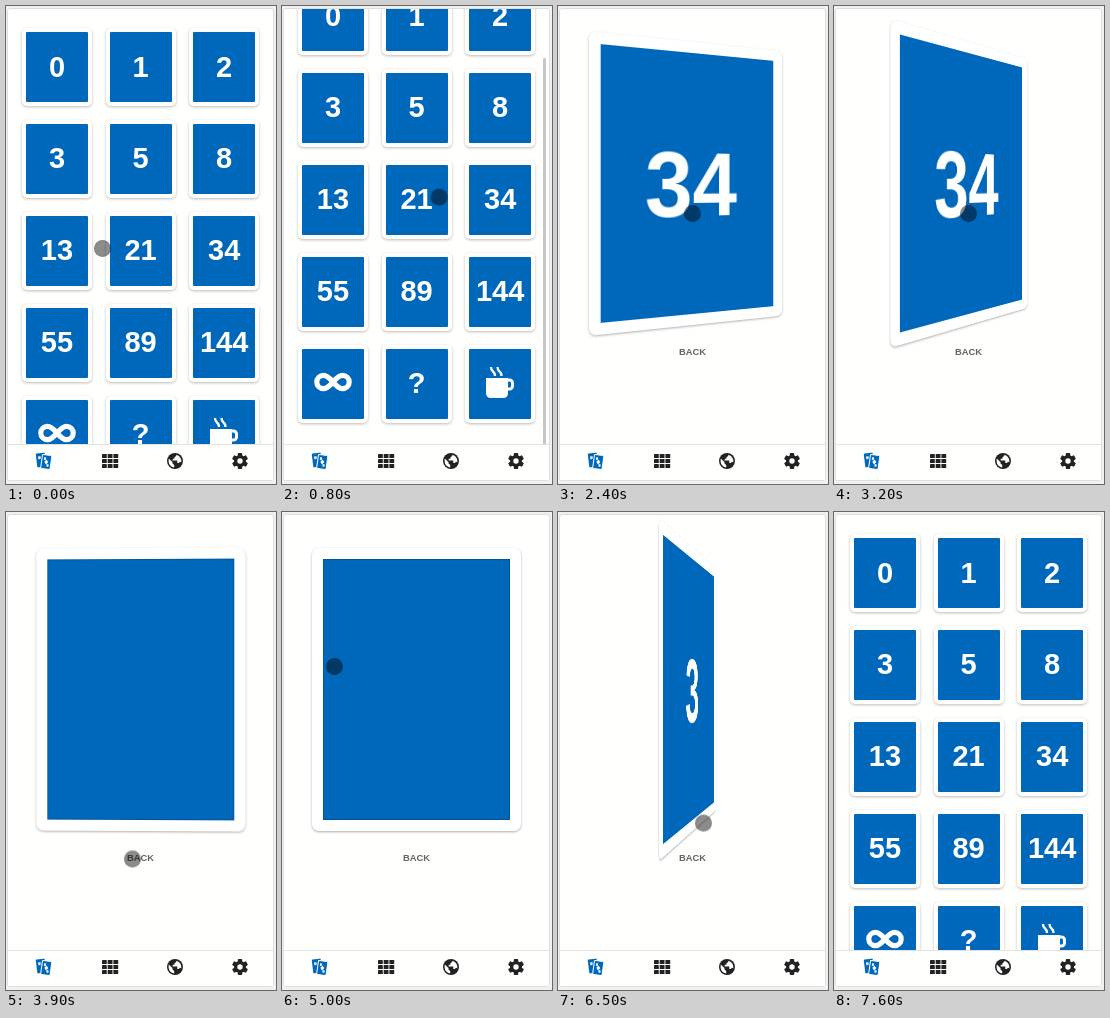
Recreate the animation shown at these times as an HTML page. Size 270x478 px, loop 9000 ms.

```html
<!DOCTYPE html>
<html lang="en">
<head>
<meta charset="utf-8">
<title>Planning cards</title>
<style>
  :root { --blue: #0068ba; --paper: #fffffd; --ink: #222; --loop: 9s linear infinite; }
  * { box-sizing: border-box; }
  html, body { margin: 0; width: 100%; height: 100%; overflow: hidden; background: #f1f1ef; }
  #stage {
    position: relative; width: 270px; height: 478px; overflow: hidden;
    font: bold 29px "Liberation Sans", Arial, sans-serif; color: #fff;
  }
  #stage > *, .face, .face b { position: absolute; }

  #phone {
    left: 1px; top: 2px; width: 267px; height: 473px;
    background: var(--paper); border: 1px solid #dededc; border-radius: 3px;
  }

  /* Overview */
  #overview { left: 2px; top: 3px; width: 265px; height: 435px; overflow: hidden; animation: overview var(--loop); }
  #grid {
    position: absolute; left: 14px; top: 19px;
    display: grid; grid: repeat(5, 78px) / repeat(3, 70px); gap: 13.9px 13.6px;
    animation: scroll var(--loop);
  }
  .tile {
    display: flex; align-items: center; justify-content: center;
    background: var(--blue); border: 4px solid #fff; border-radius: 5px;
    box-shadow: 0 1px 3px rgba(0, 0, 0, .27);
  }
  .tile svg { overflow: visible; }
  #bar {
    left: 261px; top: 52px; width: 3px; height: 415px; border-radius: 2px;
    background: rgba(0, 0, 0, .35); animation: bar var(--loop);
  }

  /* Single card */
  #detail { inset: 0; animation: detail var(--loop); }
  #scene { position: absolute; left: 30px; top: 36px; width: 209px; height: 283px; perspective: 576px; }
  #card { width: 100%; height: 100%; transform-style: preserve-3d; animation: flip var(--loop); }
  .face {
    inset: 0; background: #fff; border-radius: 7px; backface-visibility: hidden;
    box-shadow: 0 1px 2.5px rgba(0, 0, 0, .32);
  }
  .face::before { content: ""; position: absolute; inset: 11px; background: var(--blue); }
  .back { transform: rotateY(180deg); }
  .back::before { box-shadow: inset 0 0 0 .7px #004f8e; }
  .face b { inset: 2px 0 -2px; font-size: 90px; line-height: 283px; text-align: center; }
  .first { animation: first var(--loop); }
  .second { animation: second var(--loop); }
  #label {
    position: absolute; left: 0; top: 338px; width: 269px; text-align: center;
    font-size: 9.4px; line-height: 16px; color: #666;
  }

  #tabs { left: 0; top: 438px; }
  #touch {
    left: -8.5px; top: -8.5px; width: 17px; height: 17px; border-radius: 50%;
    background: radial-gradient(circle, rgba(0, 0, 0, .45) 52%, rgba(0, 0, 0, .5) 80%, rgba(0, 0, 0, .2) 100%);
    animation: touch var(--loop);
  }

  @keyframes overview {
    0%, 14.33% { visibility: visible; }
    14.34%, 45.44% { visibility: hidden; }
    45.45%, 55.44% { visibility: visible; }
    55.45%, 80.99% { visibility: hidden; }
    81%, 100% { visibility: visible; }
  }
  @keyframes detail {
    0%, 14.33% { visibility: hidden; }
    14.34%, 45.44% { visibility: visible; }
    45.45%, 55.44% { visibility: hidden; }
    55.45%, 80.99% { visibility: visible; }
    81%, 100% { visibility: hidden; }
  }
  @keyframes first { 0%, 50% { opacity: 1; } 50.01%, 100% { opacity: 0; } }
  @keyframes second { 0%, 50% { opacity: 0; } 50.01%, 100% { opacity: 1; } }
  @keyframes scroll {
    0%, .4% { transform: none; }
    3.3%, 20% { transform: translateY(-51px); }
    20.01%, 100% { transform: none; }
  }
  @keyframes bar {
    0%, .4% { opacity: 0; transform: translateY(-46px); }
    1% { opacity: 1; }
    3.3% { transform: none; }
    7.2% { opacity: 1; }
    12%, 100% { opacity: 0; transform: none; }
  }
  @keyframes flip {
    0% { transform: rotateY(180deg); }
    20.23% { transform: rotateY(180deg); animation-timing-function: ease; }
    31.34% { transform: rotateY(0deg); }
    33.44% { transform: rotateY(0deg); animation-timing-function: ease; }
    44.5% { transform: rotateY(180deg); }
    60.28% { transform: rotateY(180deg); animation-timing-function: ease; }
    69.44% { transform: rotateY(0deg); animation-timing-function: ease; }
    80.5%, 100% { transform: rotateY(180deg); }
  }
  @keyframes touch {
    0%, .4% { transform: translate(96px, 242px); }
    3.3%, 5% { transform: translate(84px, 188px); }
    12.2%, 14.2% { transform: translate(218px, 193px); }
    18.8%, 37% { transform: translate(134px, 207px); }
    43.3%, 47.8% { transform: translate(126px, 346.5px); }
    53.3%, 57% { transform: translate(52px, 154px); }
    59.4%, 69.4% { transform: translate(126px, 173.5px); }
    72.22% { transform: translate(145px, 310.5px); }
    78.8%, 82.4% { transform: translate(135px, 352px); visibility: visible; }
    83.3%, 84.38% { transform: translate(191px, 278px); visibility: visible; }
    84.39%, 99.99% { transform: translate(191px, 278px); visibility: hidden; }
    100% { transform: translate(96px, 242px); visibility: visible; }
  }
</style>
</head>
<body>
<div id="stage">
  <div id="phone"></div>

  <div id="overview">
    <div id="grid">
      <div class="tile">0</div><div class="tile">1</div><div class="tile">2</div>
      <div class="tile">3</div><div class="tile">5</div><div class="tile">8</div>
      <div class="tile">13</div><div class="tile">21</div><div class="tile">34</div>
      <div class="tile">55</div><div class="tile">89</div><div class="tile">144</div>
      <div class="tile">
        <svg width="38" height="24" viewBox="-19 -10 38 24" fill="none" stroke="#fff" stroke-width="5.2">
          <path d="M0 0C5-6 7-6.7 9.5-6.7A6.7 6.7 0 0 1 9.5 6.7C7 6.7 5 6 0 0C-5-6-7-6.7-9.5-6.7A6.7 6.7 0 0 0-9.5 6.7C-7 6.7-5 6 0 0Z"/>
        </svg>
      </div>
      <div class="tile">?</div>
      <div class="tile">
        <svg width="28" height="34" viewBox="0 0 28 34" fill="none" stroke="#fff">
          <path d="M0 11H22V26Q22 31 17 31H5Q0 31 0 26Z" fill="#fff" stroke="none"/>
          <path d="M21 13H23.5A3 3 0 0 1 26.5 16V19A3 3 0 0 1 23.5 22H21" stroke-width="3"/>
          <path d="M5 0Q5 3 7 4.500T9 9M11.500 0Q11.500 3 13.500 4.500T15.500 9" stroke-width="2.300"/>
        </svg>
      </div>
    </div>
  </div>
  <div id="bar"></div>

  <div id="detail">
    <div id="label">BACK</div>
    <div id="scene">
      <div id="card">
        <div class="face"><b class="first">34</b><b class="second">3</b></div>
        <div class="face back"></div>
      </div>
    </div>
  </div>

  <svg id="tabs" width="270" height="37" fill="#222">
    <path d="M2 0H267V36H2Z" fill="#fffffd"/>
    <path d="M2 0H267" stroke="#d9d9d7" stroke-width="1.5"/>
    <g fill="#0068ba">
      <rect x="30.500" y="9" width="9" height="14" rx="1" transform="rotate(-7 35 16)"/>
      <g transform="rotate(8 40 18)">
        <rect x="35.500" y="11" width="9.500" height="14" rx="1" stroke="#fffffd"/>
        <path d="M37.500 13.500h2v2.500h-2zM41 20h2v2.500h-2zM40.300 15.500l2 2.500-2 2.500-2-2.500z" fill="#fffffd"/>
      </g>
      <path d="M32 12.500l2.500-.3.2 2.300-2 1z" fill="#fffffd"/>
    </g>
    <g id="cells"></g>
    <g transform="translate(169 17)">
      <circle r="8"/>
      <path d="M-6.300-2.500L-2.500 1V2.500L-.8 4V6.400Q-6 5.500-6.400.5ZM1.500-6.300Q1.500-4.300-.5-4V-2.200H-2.300V-.5H2.300V2H4Q5-.2 6.300 1.500Q7-4.200 1.500-6.300Z" fill="#fffffd"/>
    </g>
    <g transform="translate(234 17)">
      <circle r="6"/>
      <g id="teeth"></g>
      <circle r="2.700" fill="#fffffd"/>
    </g>
  </svg>
  <div id="touch"></div>
</div>
<script>
  const repeat = (id, n, shape) =>
    document.getElementById(id).innerHTML = Array.from({ length: n }, (_, i) => shape(i)).join("");

  repeat("cells", 9, i =>
    `<rect x="${96 + i % 3 * 5.7}" y="${10 + Math.floor(i / 3) * 5}" width="4.8" height="4.1" rx=".4"/>`);
  repeat("teeth", 3, i =>
    `<rect x="-2.2" y="-8" width="4.4" height="16" rx=".8" transform="rotate(${i * 60})"/>`);
</script>
</body>
</html>
```
